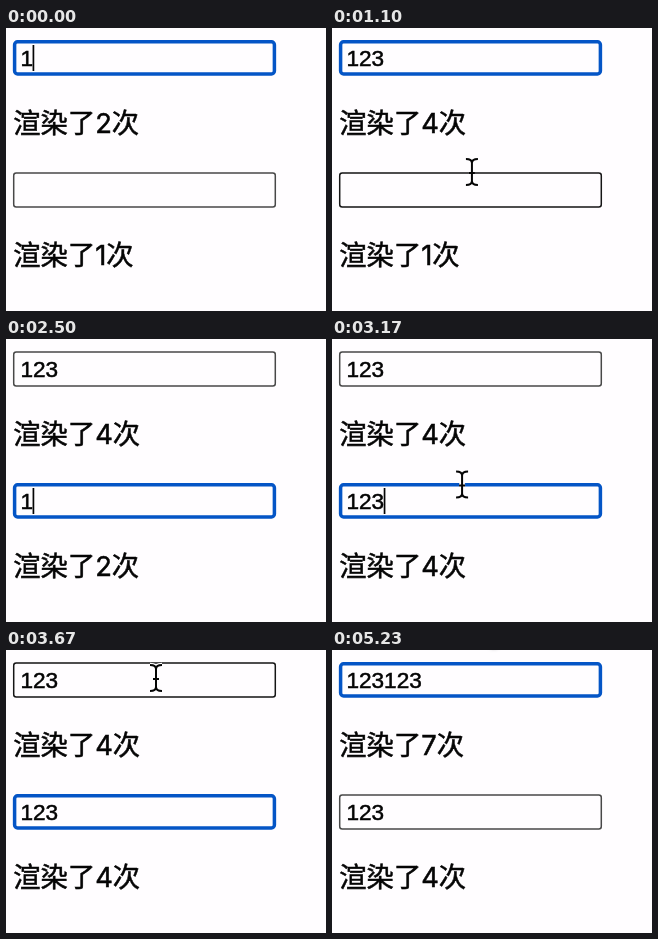
These frames come from a looping animation (320 by 283 pixels, 5560 ms). An HTML page with a canvas:

```html
<!DOCTYPE html>
<html lang="zh">
<head>
<meta charset="utf-8">
<style>
html, body { margin: 0; width: 100%; height: 100%; overflow: hidden; background: #fffdff; }
canvas { display: block; }
</style>
</head>
<body>
<canvas id="stage" width="320" height="283"></canvas>
<script>
const ctx = document.getElementById('stage').getContext('2d');
const LOOP = 5560, BLINK = 500, ROW = 132, INK = '#050505', PAPER = '#fffdff';

// three keystrokes at an even pace
const burst = start => [0, 1, 2].map(i => start + i * 265);
const keys = [[0, 30, 400, ...burst(4170)], burst(2470)];
const toSecond = 2000, toFirst = 3870;

// pointer waypoints: time, x, y
const moves = [
  [[470, 157, 68], [670, 158, 74], [1100, 140, 144], [1400, 130, 154]],
  [[3070, 130, 154], [3170, 130, 146], [3670, 150, 28]],
  [[4900, 150, 28], [5070, 152, -32]]
];

const lastBefore = (times, t) => Math.max(...times.filter(time => time <= t));
const easeOut = k => 1 - (1 - k) ** 2;

// the pointer shows once it moves and hides at the next keystroke
function pointerAt(t) {
  const path = moves.filter(p => p[0][0] <= t).pop();
  if (!path || path[0][0] < lastBefore(keys.flat(), t)) return null;
  const i = path.findIndex(p => p[0] > t);
  if (i < 0) {
    const [, x, y] = path[path.length - 1];
    return { x, y };
  }
  const [t0, x0, y0] = path[i - 1], [t1, x1, y1] = path[i];
  const k = easeOut((t - t0) / (t1 - t0));
  return { x: x0 + (x1 - x0) * k, y: y0 + (y1 - y0) * k };
}

const inField = (p, row) => p && p.y >= 10 + row * ROW && p.y <= 49 + row * ROW;

// a hairline outline gives the text its slightly heavier weight
function drawText(text, x, y, font) {
  ctx.font = font;
  ctx.fillStyle = ctx.strokeStyle = INK;
  ctx.lineWidth = 0.5;
  ctx.fillText(text, x, y);
  ctx.strokeText(text, x, y);
  return x + ctx.measureText(text).width;
}

function drawField(row, text, focused, hovered, caret) {
  const top = row * ROW;
  const inset = focused ? 8.6 : 7.7;
  ctx.beginPath();
  ctx.roundRect(inset, top + inset + 5.2, 277 - 2 * inset, 49.4 - 2 * inset, focused ? 3 : 2.5);
  ctx.lineWidth = focused ? 3.5 : 1.5;
  ctx.strokeStyle = focused ? '#0455c6' : hovered ? '#151515' : '#484848';
  ctx.stroke();
  const end = drawText(text, 14.4, top + 37.6, '22.6px "Liberation Sans", Arial, sans-serif');
  if (caret) ctx.fillRect(end - 0.4, top + 17, 1.7, 26);
}

function drawLabel(row, count) {
  const y = 105 + row * ROW;
  const han = '27.3px "Noto Sans CJK SC", "Noto Sans CJK", sans-serif';
  let x = drawText('渲染了', 7.3, y, han);
  x = drawText(String(count), x, y, '27.3px Inter, sans-serif');
  drawText('次', x, y, han);
}

const arrow = new Path2D('M0 0V23L5.2 18.2L9 27.2L12.9 25.6L9.1 16.8H16Z');
const beam = new Path2D('M-6 -13Q0 -13 0 -9Q0 -13 6 -13M0 -9V9M-6 13Q0 13 0 9Q0 13 6 13M-3 1H3');

function drawPointer(p) {
  ctx.save();
  ctx.translate(p.x, p.y);
  ctx.lineJoin = 'round';
  if (inField(p, 0) || inField(p, 1)) {
    ctx.strokeStyle = PAPER;
    ctx.lineWidth = 4.5;
    ctx.stroke(beam);
    ctx.strokeStyle = INK;
    ctx.lineWidth = 2;
    ctx.stroke(beam);
  } else {
    ctx.shadowColor = 'rgba(0,0,0,.35)';
    ctx.shadowBlur = 4;
    ctx.shadowOffsetY = 2;
    ctx.strokeStyle = '#fff';
    ctx.lineWidth = 3;
    ctx.stroke(arrow);
    ctx.shadowColor = 'transparent';
    ctx.fillStyle = INK;
    ctx.fill(arrow);
  }
  ctx.restore();
}

function draw(now) {
  const t = now % LOOP;
  const pointer = pointerAt(t);
  const active = t >= toSecond && t < toFirst ? 1 : 0;
  // every key or click restarts the caret's blinking
  const idle = t - lastBefore([...keys.flat(), toSecond, toFirst], t);
  const caret = Math.floor(idle / BLINK) % 2 === 0;
  ctx.fillStyle = PAPER;
  ctx.fillRect(0, 0, 320, 283);
  keys.forEach((times, row) => {
    const count = times.filter(time => time <= t).length;
    const focused = active === row;
    drawField(row, '123123'.slice(0, count), focused, inField(pointer, row), focused && caret);
    drawLabel(row, count + 1);
  });
  if (pointer) drawPointer(pointer);
}

const start = performance.now();
function tick() {
  draw(performance.now() - start);
  requestAnimationFrame(tick);
}
tick();
</script>
</body>
</html>
```
